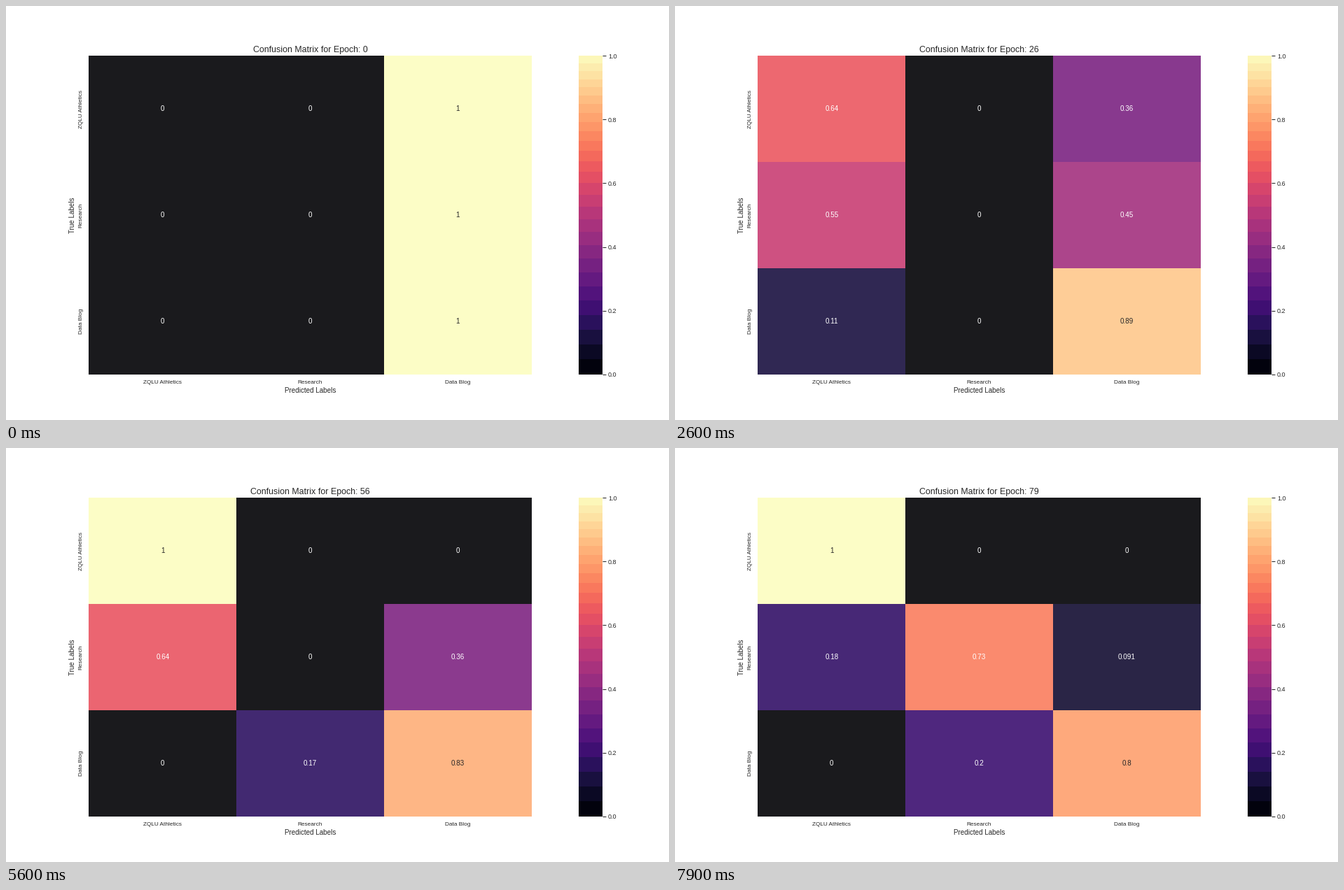
Animation of 947x592 px, one loop 8 s. Source, as a matplotlib script:

```python
import matplotlib.pyplot as plt
import numpy as np
from matplotlib.animation import FuncAnimation
from matplotlib.colors import ListedColormap

W, H, DPI = 947, 592, 64
PT = 59.2 / DPI  # layout is designed for 16 x 10 inches
INK = "0.15"
EPOCHS = 80
BANDS = 28
LABELS = ["ZQLU Athletics", "Research", "Data Blog"]

plt.rcParams.update({
    "font.family": "Liberation Sans",
    "text.color": INK,
    "axes.labelcolor": INK,
    "xtick.color": INK,
    "ytick.color": INK,
})

MAGMA = plt.get_cmap("magma")
SOFT = ListedColormap(MAGMA(np.arange(256))[:, :3] * 0.9 + 0.1)


def confusion(epoch):
    """Row-normalised matrix: samples drift between classes in whole counts."""
    def ramp(start, end, count):
        return count * np.clip((epoch - start) / (end - start), 0, 1)

    def row(total, **known):
        counts = {k: np.round(v) for k, v in known.items()}
        rest = total - sum(counts.values())
        return [counts.get(k, rest) / total for k in ("first", "second", "third")]

    kept = 31 <= epoch < 41 or epoch >= 59
    return np.array([
        row(14, first=ramp(10, 18, 9) + ramp(32, 50, 5), second=0),
        row(11, second=kept + ramp(67, 79, 7),
            third=11 - ramp(6, 31, 7) - ramp(67, 79, 3)),
        row(35, first=ramp(7, 11, 4) - ramp(36, 45, 4),
            second=ramp(36, 45, 6) + ramp(67, 73, 1)),
    ])


def ink_on(value):
    """Dark text on light cells, by relative luminance."""
    rgb = np.array(MAGMA(value)[:3])
    lin = np.where(rgb <= 0.03928, rgb / 12.92, ((rgb + 0.055) / 1.055) ** 2.4)
    return INK if lin @ [0.2126, 0.7152, 0.0722] > 0.408 else "white"


def add_axes(x0, x1):
    ax = fig.add_axes([x0 / W, 0.11, (x1 - x0) / W, 0.77])
    ax.spines[:].set_visible(False)
    ax.tick_params(length=6 * PT, width=1.25 * PT, pad=3.5 * PT)
    return ax


fig = plt.figure(figsize=(W / DPI, H / DPI), dpi=DPI, facecolor="white")

ax = add_axes(118.4, 750.6)
mesh = ax.pcolormesh(np.arange(4), np.arange(4), confusion(0),
                     cmap=SOFT, vmin=0, vmax=1)
centers = np.arange(3) + 0.5
ax.set(xlim=(0, 3), ylim=(3, 0))
ax.set_xticks(centers, LABELS)
ax.set_yticks(centers, LABELS, rotation=90, va="center")
ax.tick_params(labelsize=10 * PT, bottom=False, left=False)
ax.set_xlabel("Predicted Labels", fontsize=12 * PT, labelpad=4 * PT)
ax.set_ylabel("True Labels", fontsize=12 * PT, labelpad=4 * PT)
title = ax.set_title("", fontsize=15 * PT, pad=6 * PT)
notes = [ax.text(x, y, "", fontsize=12 * PT, ha="center", va="center")
         for y in centers for x in centers]

# Colour bar in flat bands, taller towards the dark end.
bar = add_axes(817.6, 852.3)
t = np.linspace(0, 1, BANDS + 1)
levels = t + 0.1 * np.sin(np.pi * t)
bar.barh(levels[:-1], 1, np.diff(levels), align="edge", linewidth=0,
         antialiased=False, color=MAGMA((levels[:-1] + levels[1:]) / 2))
bar.set(xlim=(0, 1), ylim=(0, 1), xticks=[])
bar.yaxis.tick_right()
bar.set_yticks(np.linspace(0, 1, 6))
bar.tick_params(labelsize=11 * PT)


def update(epoch):
    values = confusion(epoch)
    mesh.set_array(values)
    title.set_text(f"Confusion Matrix for Epoch: {epoch}")
    for note, v in zip(notes, values.ravel()):
        note.set_text(f"{v:.2g}")
        note.set_color(ink_on(v))
    return [mesh, title, *notes]


anim = FuncAnimation(fig, update, frames=EPOCHS, interval=100,
                     repeat=True, repeat_delay=0, blit=False)
plt.show()
```
